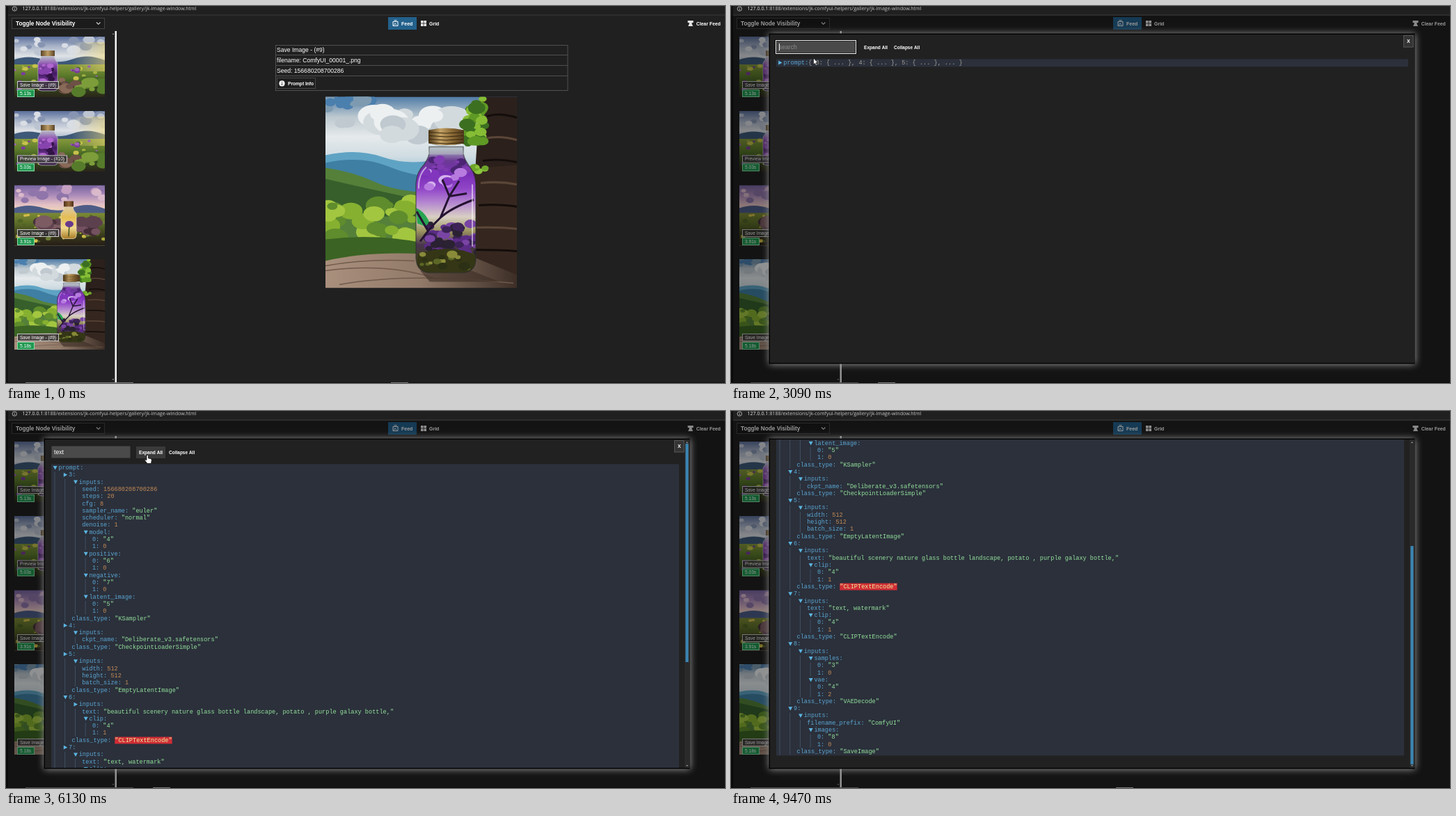
Animation of 1033 by 542 pixels, one loop 9.56 s. Source, as an HTML page with a canvas:

```html
<!DOCTYPE html>
<html lang="en">
<head>
<meta charset="utf-8">
<title>Image feed</title>
<style>
html, body { margin: 0; width: 100%; height: 100%; overflow: hidden; background: #202020; }
canvas { display: block; }
</style>
</head>
<body>
<canvas id="stage" width="1033" height="542"></canvas>
<script>
const W = 1033, H = 542, LOOP = 9560;
const SANS = '"Liberation Sans", Arial, sans-serif';
const MONO = '"Liberation Mono", "Courier New", monospace';
const stage = document.getElementById('stage').getContext('2d');
let g = stage;

// --- drawing helpers ---
const clamp = v => Math.max(0, Math.min(1, v));
function rect(x, y, w, h, fill, line) {
  if (fill) { g.fillStyle = fill; g.fillRect(x, y, w, h); }
  if (line) { g.strokeStyle = line; g.lineWidth = 1; g.strokeRect(x + .5, y + .5, w - 1, h - 1); }
}
function text(s, x, y, size = 8.58, color = '#fff', font = SANS, weight = '') {
  g.font = `${weight} ${size}px ${font}`;
  g.fillStyle = color;
  g.fillText(s, x, y);
  return g.measureText(s).width;
}
const bold = (s, x, y, size = 6.5, color = '#fff') => text(s, x, y, size, color, SANS, 'bold');
function shape(d, fill, line, width = 1) {
  const p = new Path2D(d);
  if (fill) { g.fillStyle = fill; g.fill(p); }
  if (line) { g.strokeStyle = line; g.lineWidth = width; g.stroke(p); }
}
function dot(x, y, rx, ry, fill) {
  g.fillStyle = fill;
  g.beginPath();
  g.ellipse(x, y, rx, ry, 0, 0, 7);
  g.fill();
}
function fade(x0, y0, x1, y1, ...stops) {
  const f = g.createLinearGradient(x0, y0, x1, y1);
  stops.forEach((c, i) => f.addColorStop(i / (stops.length - 1), c));
  return f;
}
function blobs(seed, n, x, y, w, h, r, colors) {
  const rnd = () => (seed = seed * 16807 % 2147483647) / 2147483647;
  rnd();
  for (let i = 0; i < n; i++) {
    const s = r * (.5 + rnd());
    dot(x + rnd() * w, y + rnd() * h, s * 1.4, s, colors[i % colors.length]);
  }
}
function picture(x, y, w, h, scale, paint) {
  g.save();
  g.beginPath();
  g.rect(x, y, w, h);
  g.clip();
  g.translate(x, y);
  g.scale(scale, scale);
  paint();
  g.restore();
}

// --- pictures ---
function galaxyBottle() {
  rect(0, 0, 275, 120, fade(0, 0, 0, 115, '#4f7ba6', '#bcc8cf', '#e6eaec', '#cfdce2', '#8fbcd2'));
  blobs(5, 12, 0, 0, 80, 18, 7, ['#4a7fae', '#7d9ab0']);
  blobs(9, 26, 10, 20, 190, 40, 13, ['#edf0f1', '#d3dade', '#bfc9cf']);
  shape('M0 84Q45 74 80 86T150 92V150H0Z', '#5fa3c4');
  shape('M0 95Q50 84 90 100T150 112V160H0Z', '#3f7fa3');
  shape('M0 102Q40 108 70 122T150 138V236H0Z', '#55803a');
  shape('M0 118Q60 132 145 150V172H0Z', '#365f2b');
  blobs(17, 30, 0, 150, 135, 55, 9, ['#86b030', '#a3c640', '#5f8c2c']);
  shape('M0 205Q70 196 140 210V240H0Z', '#3b6323');
  shape('M222 0H275V118L215 108Z', '#2b201b');
  shape('M205 104L275 98V262L205 240Z', '#35271f');
  for (let i = 0; i < 7; i++)
    shape(`M${232 - i * 3} ${28 + i * 32}Q250 ${22 + i * 33} 275 ${30 + i * 32}`, null, i % 2 ? '#5b4638' : '#130d0b', 3);
  blobs(31, 36, 203, 0, 26, 70, 6, ['#5f9a25', '#86bd35', '#3c7020']);
  blobs(12, 8, 214, 100, 24, 7, 4, ['#6ea52b', '#8cc43c']);
  shape('M0 236Q60 222 140 226L216 232L275 256V275H0Z', fade(0, 0, 275, 0, '#a9907d', '#927a69', '#3c2e26'));
  shape('M0 250Q90 238 160 262M20 270Q120 252 270 268M0 243Q60 232 128 236', null, '#705a4b', 1.5);
  shape('M136 250H210L250 266H150Z', '#3b2c2399');

  const body = 'M149 72V82Q147 92 137 103Q129 114 130 134V232Q131 252 150 253H197Q216 252 216 232V134Q217 114 209 103Q200 92 198 82V72Z';
  g.save();
  g.clip(new Path2D(body));
  rect(125, 65, 95, 192, fade(0, 72, 0, 253, '#b9c9cc', '#6b3a94', '#7a2fb8', '#9146c8', '#b588d0', '#d8cfc4', '#9d9660', '#49354f', '#40401c', '#5e6128'));
  blobs(41, 16, 148, 88, 55, 18, 4, ['#4b2473', '#7f3bb0']);
  blobs(23, 14, 142, 106, 55, 25, 5, ['#b77be0', '#8136bd', '#d4b2ee']);
  shape('M130 160Q145 165 153 190L132 182Z', '#27a552');
  blobs(77, 50, 148, 182, 72, 42, 5, ['#5b2c86', '#3c2257', '#7944a4', '#2a2132']);
  shape('M133 226Q180 210 217 228V253H130Z', '#343616');
  blobs(8, 15, 135, 225, 75, 24, 4, ['#5c6726', '#2c3014', '#8a8b39']);
  shape('M136 208Q150 188 165 174L178 143L203 139M165 174Q180 160 213 148M178 143L168 119M178 143L192 121M148 194L131 165', null, '#251332', 3);
  g.restore();
  shape(body, null, '#2b2a2c99', 1.5);
  shape('M134 132Q133 112 145 101M211 126V215', null, '#ffffff88', 2);
  shape('M150 73H197L199 83H147Z', '#b8c3c388');
  shape('M148 48Q173 42 199 48V67Q173 72 148 67Z', fade(148, 0, 199, 0, '#4d3717', '#c4a265', '#8a6935', '#50391c'));
  for (let y = 51; y < 68; y += 5) shape(`M149 ${y}Q173 ${y + 3} 198 ${y}`, null, '#38280f', 1);
}

function meadow(sky, hill, grass) {
  rect(0, 0, 130, 87, fade(0, 0, 0, 42, ...sky));
  shape('M0 33Q20 26 42 33T85 32T130 34V50H0Z', hill);
  rect(0, 40, 130, 47, fade(0, 40, 0, 87, ...grass));
}

function purpleBottle() {
  meadow(['#5b6f9c', '#a9b4c8', '#dfe2e6', '#94a9c4'], '#3d5878', ['#85983c', '#5b7a2b', '#354b1d', '#2a2519']);
  blobs(3, 18, 0, 3, 130, 20, 5, ['#d9dde4', '#8795b2', '#bcc4d2']);
  rect(82, 8, 48, 42, fade(82, 0, 130, 0, '#f5df8a00', '#f4dc7788'));
  blobs(21, 55, 0, 42, 130, 34, 2.2, ['#7a3c9c', '#a5b343', '#486b26', '#9d62b5', '#c6c24c']);
  blobs(15, 13, 62, 62, 33, 15, 5, ['#6d5146', '#4c362f', '#886a58']);
  blobs(55, 10, 90, 65, 38, 15, 5, ['#567c2b', '#7d9d3a']);
  shape('M39 28Q38 33 34 38V74Q35 78 39 78H58Q62 77 62 74V38Q58 33 57 28Z', fade(0, 28, 0, 78, '#b9bec6', '#8a4cb0', '#40195f', '#7c3ca0', '#30203a'), '#c8c8d5aa');
  blobs(28, 18, 37, 40, 21, 33, 3, ['#321346', '#8743ae', '#b167ce']);
  rect(38, 20, 20, 8, fade(38, 0, 58, 0, '#5b4426', '#bd9d65', '#5b4426'));
}

function amberBottle() {
  meadow(['#76639f', '#a989b8', '#e3c0c4', '#f2dfae'], '#4d5c86', ['#7d8a35', '#5a6b28', '#3b3c1d', '#251d16']);
  blobs(6, 16, 0, 2, 130, 20, 5, ['#8f75aa', '#c5a0c2', '#d9b9ca']);
  blobs(14, 60, 0, 43, 130, 38, 1.8, ['#a9a73c', '#506325', '#d3bd4a', '#6d7b36']);
  blobs(19, 13, 36, 52, 28, 17, 6, ['#61434f', '#48313a', '#7c5b62']);
  blobs(33, 14, 92, 52, 30, 17, 6, ['#5d404d', '#432c36', '#745160']);
  shape('M72 31Q72 36 67 41V73Q68 77 72 77H85Q89 76 89 73V41Q84 36 84 31Z', fade(0, 31, 0, 77, '#dcc9a9', '#e5bd55', '#f0d98c', '#a87b26'), '#efe3c4aa');
  shape('M79 56L78 74', null, '#41501f', 1.5);
  dot(79, 56, 6, 4.5, '#683a8d');
  rect(71, 23, 14, 8, fade(71, 0, 85, 0, '#4c3019', '#93683a', '#4c3019'));
}

function badge(y, name, time) {
  rect(16, y - 23, name.length > 17 ? 72 : 60, 11, '#333333cc', '#c8c8c8');
  text(name, 20, y - 15.4, 6.5);
  rect(16, y - 11, 25, 11, '#1f9850', '#8fdcae');
  text(time, 20, y - 3.2, 6.6);
}

function paintPage() {
  rect(0, 0, W, H, '#202020');
  rect(0, 0, 3, H, '#111');
  rect(3, 12.5, W, 1, '#3a3a3a');
  shape('M15.5 4A3.2 3.2 0 1 1 9.1 4A3.2 3.2 0 1 1 15.5 4M12.3 3.6V6M12.3 2V2.8', null, '#ccc', .8);
  const w = text('127.0.0.1', 23.5, 6.3, 7.1, '#e8e8e8', '"Open Sans", sans-serif');
  text(':8188/extensions/jk-comfyui-helpers/gallery/jk-image-window.html', 23.5 + w, 6.3, 7.1, '#c4c4c4', '"Open Sans", sans-serif');

  rect(8, 17, 134, 16, '#1b1b1b', '#444');
  bold('Toggle Node Visibility', 14, 28, 8.25);
  shape('M130 23.5L132.7 26.3L135.4 23.5', null, '#ddd', 1.1);
  rect(549, 16, 41, 18, '#23618c');
  shape('M556 22.5H563V28.5H556ZM557.5 20.7H561.5M557 27.5L559 25L561 27', null, '#fff', 1);
  bold('Feed', 568, 27.5, 7);
  for (const [x, y] of [[596, 21], [600.4, 21], [596, 25.4], [600.4, 25.4]]) rect(x, y, 3.6, 3.6, '#eee');
  bold('Grid', 608, 27.5, 7);
  shape('M979.5 21H987.5V24H985.5V26L987 29H980L981.5 26V24H979.5Z', '#e4e4e4');
  bold('Clear Feed', 991.7, 27.5, 6.85);

  picture(12, 44, 130, 87.5, 1, purpleBottle);
  picture(12, 151, 130, 87, 1, purpleBottle);
  picture(12, 257.5, 130, 87, 1, amberBottle);
  picture(12, 364, 130, 130, 130 / 275, galaxyBottle);
  badge(131, 'Save Image - (#9)', '5.13s');
  badge(237.5, 'Preview Image - (#10)', '5.03s');
  badge(344, 'Save Image - (#9)', '3.91s');
  badge(494, 'Save Image - (#9)', '5.18s');
  shape('M152.5 41L154 39L155.5 41ZM152.5 536L154 538L155.5 536Z', '#888');
  rect(156.5, 36, 2.5, 505, '#f4f4f4');

  rect(387, 56, 420.5, 66, null, '#505050');
  for (const y of [70, 85, 100]) rect(387, y, 420, 1, '#505050');
  text('Save Image - (#9)', 389, 66);
  text('filename: ComfyUI_00001_.png', 389, 81);
  text('Seed: 156680208700286', 389, 96);
  picture(459, 130.5, 275, 275, 1, galaxyBottle);
  rect(0, 541, W, 1, '#101010');
  rect(28, 541, 155, 1, '#777');
}

function promptButton(hover) {
  rect(389, 103, 56, 16, hover ? '#3c3c3c' : '#1e1e1e', hover ? '#3c3c3c' : '#474747');
  dot(396.5, 111.4, 4.1, 4.1, '#fff');
  rect(396, 110.8, 1, 3, '#222');
  rect(396, 109, 1, 1, '#222');
  bold('Prompt Info', 405, 113.8, 6.6);
}

// --- prompt tree ---
const prompt = {
  3: { inputs: { seed: 156680208700286, steps: 20, cfg: 8, sampler_name: 'euler', scheduler: 'normal', denoise: 1,
    model: ['4', 0], positive: ['6', 0], negative: ['7', 0], latent_image: ['5', 0] }, class_type: 'KSampler' },
  4: { inputs: { ckpt_name: 'Deliberate_v3.safetensors' }, class_type: 'CheckpointLoaderSimple' },
  5: { inputs: { width: 512, height: 512, batch_size: 1 }, class_type: 'EmptyLatentImage' },
  6: { inputs: { text: 'beautiful scenery nature glass bottle landscape, potato , purple galaxy bottle,', clip: ['4', 1] }, class_type: 'CLIPTextEncode' },
  7: { inputs: { text: 'text, watermark', clip: ['4', 1] }, class_type: 'CLIPTextEncode' },
  8: { inputs: { samples: ['3', 0], vae: ['4', 2] }, class_type: 'VAEDecode' },
  9: { inputs: { filename_prefix: 'ComfyUI', images: ['8', 0] }, class_type: 'SaveImage' }
};
const OPEN = 1780, FOUND = 4410, EXPAND = 6130;
const LINE = 10.31, INDENT = 14.7, CHAR = 5.148;
const isNode = v => typeof v === 'object';

function brief(v) {
  if (Array.isArray(v)) return '[ ... ]';
  if (isNode(v)) return '{ ... }';
  return typeof v === 'string' ? `"${v.length > 15 ? v.slice(0, 15) + '...' : v}"` : v;
}
function preview(node) {
  const all = Object.entries(node), parts = all.slice(0, 3).map(([k, v]) => `${k}: ${brief(v)}`);
  if (all.length > 3) parts.push('...');
  return `{ ${parts.join(', ')} }`;
}
function isOpen(path, t) {
  return t >= EXPAND || t >= FOUND && (path === 'prompt' || path === 'prompt/6');
}
// Only nodes that were already on screen turn their arrow.
function arrowTurn(path, t) {
  if (!isOpen(path, t)) return 0;
  if (path === 'prompt') return clamp((t - FOUND) / 160);
  return /^prompt\/([^6]|6\/inputs)$/.test(path) ? clamp((t - EXPAND) / 80) : 1;
}
function hovered(t) {
  if (t < 3400 || t > 5500 && t < 6400 || t > 7850) return '';
  if (t < 5500) return 'prompt';
  return t < 6700 ? 'prompt/5/inputs' : t < 7100 ? 'prompt/7/inputs' : 'prompt/8/inputs/samples';
}

function paintTree(t) {
  let row = 0;
  const hover = hovered(t) + '/';
  const mono = (s, x, y, c) => text(s, x, y + 2.5, 8.58, c, MONO);
  function walk(key, value, path, depth) {
    const y = 81.5 + row++ * LINE, dx = depth * INDENT;
    if (!isNode(value)) {
      const x = 65.1 + dx, vx = x + (key.length + 2) * CHAR;
      const match = t >= FOUND && path === 'prompt/6/class_type';
      if (match) rect(vx, y - 4.8, 16 * CHAR, 10, '#d02c36');
      mono(key + ':', x, y, '#5aa5d2');
      const string = typeof value === 'string';
      mono(string ? `"${value}"` : value, vx, y, match ? '#e9ee9a' : string ? '#93e09a' : '#c58a55');
      return;
    }
    g.save();
    g.translate(70.6 + dx, y);
    g.rotate(arrowTurn(path, t) * Math.PI / 2);
    shape('M-2.5-3L3 0L-2.5 3Z', '#5bb4e0');
    g.restore();
    mono(key + ':', 75.3 + dx, y, '#5aa5d2');
    if (!isOpen(path, t)) {
      mono(preview(value), 75.3 + dx + (key.length + 1) * CHAR, y, depth ? '#bda592' : '#a39e98');
      return;
    }
    for (const k in value) walk(k, value[k], `${path}/${k}`, depth + 1);
    rect(69.5 + dx, y + 6, 1, 81.5 + row * LINE - y - LINE - 1, hover.startsWith(path + '/') ? '#d6dbe2' : '#425062');
  }
  const rows = t < FOUND ? 1 : t < EXPAND ? 10 : 62;
  rect(65, 76.3, t < EXPAND ? 908 : 902, rows * LINE + .8, '#2b303b');
  walk('prompt', prompt, 'prompt', 0);
}

// --- motion ---
function track(keys, t) {
  const i = keys.findIndex(k => k[0] > t);
  if (i < 1) return keys[i < 0 ? keys.length - 1 : 0].slice(1);
  const [a, b] = [keys[i - 1], keys[i]], p = (t - a[0]) / (b[0] - a[0]), e = p * p * (3 - 2 * p);
  return a.slice(1).map((v, j) => v + (b[j + 1] - v) * e);
}
const pointer = [[290, 984, 530], [1000, 413, 112], [2130, 413, 112], [2540, 112, 58], [2850, 112, 58],
  [3090, 118.5, 75], [3400, 279, 175], [5400, 279, 175], [5660, 203, 64], [6160, 203, 64], [6450, 231.5, 379],
  [7580, 231.5, 379], [7920, 852, 482]];
const clicks = [[1690, 1780], [2770, 2850], [5890, 6050]];

function scrollAt(t) {
  if (t < 6500) return 0;
  if (t < 6980) return 189.3 * (t - 6500) / 480;
  return 189.3 + 31.6 * clamp((t - 6980) / 160);
}

function paintSearch(t) {
  const focus = t < 5890;
  if (focus) {
    rect(63, 48, 118, 22, '#111');
    rect(64, 49, 116, 20, '#f0f0f0');
    rect(65, 50, 114, 18, '#111');
  }
  rect(65.5, 50.5, 113, 17, '#4a4a4a');
  const typed = 'text'.slice(0, [3720, 3790, 4100, 4250].filter(k => t >= k).length);
  const w = text(typed || 'search', 69, 62, 8.58, typed ? '#fff' : '#8b8b8b');
  const blinkFrom = t < 3720 ? OPEN : 4430;
  const lit = t >= 3720 && t < 4430 || Math.floor((t - blinkFrom) / 530) % 2 === 0;
  if (focus && lit) rect(69 + (typed ? w : 0), 54, 1, 10, '#eee');
}

function paintModal(t) {
  rect(0, 14, W, H, 'rgba(0,0,0,.4)');
  g.save();
  g.shadowColor = '#999';
  g.shadowBlur = 10;
  rect(54.5, 39.5, 928, 475, '#000');
  g.restore();

  g.save();
  g.beginPath();
  g.rect(56, 41, 926, 472);
  g.clip();
  rect(56, 41, 926, 472, '#212121');
  const y = scrollAt(t), bar = t >= EXPAND;
  g.translate(0, -y);
  if (t > 5600 && t < 6260) rect(187, 51, 42, 17, '#3a3a3a');
  paintSearch(t);
  bold('Expand All', 191, 61.8, 6.6);
  bold('Collapse All', 234, 61.8);
  paintTree(t);
  rect(bar ? 960 : 966, 42, 14.5, 17.5, '#343434', '#555');
  bold('X', bar ? 965 : 971, 53.2, 7);
  g.translate(0, y);
  if (bar) {
    rect(975, 41, 7, 472, '#2a2a2a');
    rect(976.3, 47 + y * .666, 4.2, 314, '#3b86b4');
    shape('M977 46L978.5 44L980 46ZM977 509L978.5 511L980 509Z', '#999');
  }
  g.restore();
}

function paintPointer(t) {
  if (t < 290 || t > 7920) return;
  const [x, y] = track(pointer, t);
  if (clicks.some(([a, b]) => t >= a && t < b)) dot(x, y, 6.5, 6.5, '#d6c615dd');
  const hand = t > 950 && t < OPEN || t > 3330 && t < 5450 || t > 5600 && t < 6220;
  g.save();
  g.translate(x, y);
  if (t > 2500 && t < 2900) shape('M-2-4.5H2M0-4.5V4.5M-2 4.5H2', null, '#eee', 1);
  else if (hand) shape('M-1 0Q.5-1.5 1.5 0V4L5 4.5Q6.5 5 6.3 7L5.5 11.5H0L-3.5 7Q-3.5 5-1 6.5Z', '#fff', '#111', .8);
  else shape('M0 0V9L2.1 7.2L3.5 10.4L5 9.7L3.6 6.6H6.4Z', '#fff', '#111', .7);
  g.restore();
}

const page = document.createElement('canvas');
page.width = W;
page.height = H;
g = page.getContext('2d');
paintPage();
g = stage;

function frame() {
  const t = performance.now() % LOOP;
  g.drawImage(page, 0, 0);
  promptButton(t >= 950 && t < OPEN);
  if (t >= OPEN) paintModal(t);
  if (t < 1000 || t >= 9470) rect(553, 541, 25, 1, '#777');
  else if (t >= 1690) rect(211, 541, 25, 1, '#777');
  paintPointer(t);
  requestAnimationFrame(frame);
}
frame();
</script>
</body>
</html>
```
